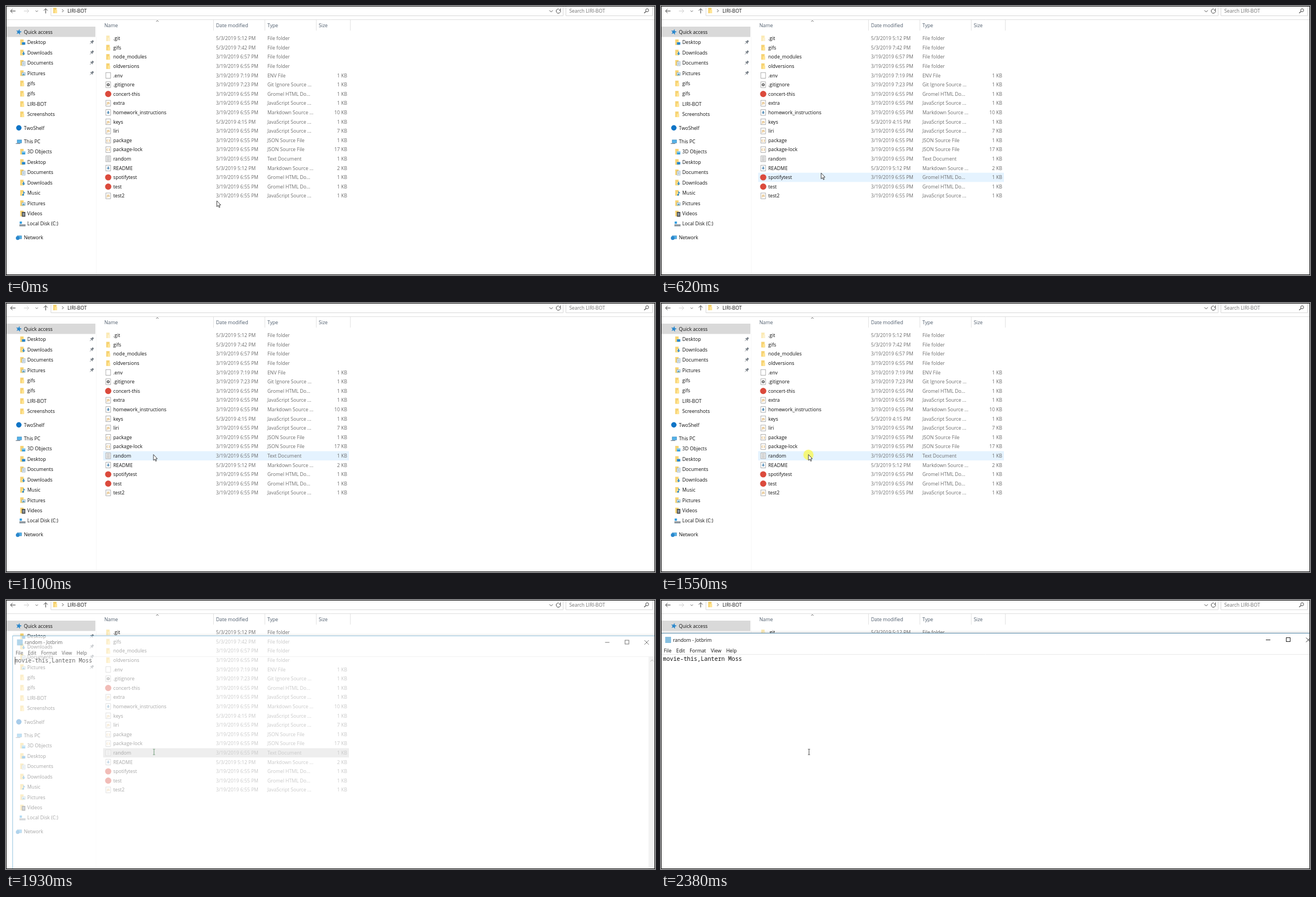
These frames come from a looping animation (1162 by 482 pixels, 2.7 s). An HTML page with a canvas:

```html
<!DOCTYPE html>
<html lang="en">
<head>
<meta charset="utf-8">
<title>File window</title>
<style>
html, body { margin: 0; width: 100%; height: 100%; overflow: hidden; background: #fff; }
canvas { display: block; width: 1162px; height: 482px; }
</style>
</head>
<body>
<canvas id="stage" width="1162" height="482"></canvas>
<script>
const W = 1162, H = 482, LOOP = 2700, OPEN = 1930;
const g = document.getElementById('stage').getContext('2d');
const SANS = '8.7px "Open Sans", "Noto Sans", sans-serif';
const MONO = '500 10.25px "Noto Sans Mono", monospace';
const ROW_TOP = 58, ROW_H = 16.6, SIDE_H = 18.45;
const DARK = '#4a4a4a', GRAY = '#6d6d6d', BLUE = '#2a87cc';

const types = {
  hidden: 'File folder', folder: 'File folder', page: 'ENV File', gear: 'Git Ignore Source ...',
  browser: 'Gromel HTML Do...', js: 'JavaScript Source ...', md: 'Markdown Source ...',
  json: 'JSON Source File', text: 'Text Document'
};
// name, kind, size in KB, date if it is not the usual one
const files = `.git,hidden,,5/3/2019 5:12 PM
gifs,folder,,5/3/2019 7:42 PM
node_modules,folder,,3/19/2019 6:57 PM
oldversions,folder
.env,page,1,3/19/2019 7:19 PM
.gitignore,gear,1,3/19/2019 7:23 PM
concert-this,browser,1
extra,js,1
homework_instructions,md,10
keys,js,1,5/3/2019 4:15 PM
liri,js,7
package,json,1
package-lock,json,17
random,text,1
README,md,2,5/3/2019 5:12 PM
spotifytest,browser,1
test,browser,1
test2,js,1`.split('\n').map(s => s.split(','));

// label=icon, one group per line
const groups = `Quick access=star,Desktop=desk,Downloads=down,Documents=docs,Pictures=pics,gifs=folder,gifs=folder,LIRI-BOT=folder,Screenshots=folder
TwoShelf=cloud
This PC=pc,3D Objects=cube,Desktop=desk,Documents=docs,Downloads=down,Music=music,Pictures=pics,Videos=video,Local Disk (C:)=disk
Network=net`.split('\n').map(s => s.split(',').map(item => item.split('=')));

function rect(x, y, w, h, color) {
  g.fillStyle = color;
  g.fillRect(x, y, w, h);
}
function trace(points) {
  g.beginPath();
  for (let i = 0; i < points.length; i += 2) g.lineTo(points[i], points[i + 1]);
}
function line(color, width, ...points) {
  g.strokeStyle = color;
  g.lineWidth = width;
  trace(points);
  g.stroke();
}
function poly(color, ...points) {
  g.fillStyle = color;
  trace(points);
  g.fill();
}
function disc(x, y, r, color) {
  g.fillStyle = color;
  g.beginPath();
  g.arc(x, y, r, 0, 7);
  g.fill();
}
function arc(x, y, r, from, to) {
  g.strokeStyle = DARK;
  g.lineWidth = 1;
  g.beginPath();
  g.arc(x, y, r, from, to);
  g.stroke();
}
function text(s, x, y, color = '#111', font = SANS, align = 'left') {
  g.font = font;
  g.textAlign = align;
  g.fillStyle = color;
  g.fillText(s, x, y + 3.2);
}
function moved(x, y, paint, turn = 0) {
  g.save();
  g.translate(x, y);
  g.rotate(turn);
  paint();
  g.restore();
}
// an open arrowhead pointing right, turned as needed
function chevron(x, y, turn, size = 2.5, color = DARK) {
  moved(x, y, () => line(color, 1, -size / 2, -size, size / 2, 0, -size / 2, size), turn);
}

// icons are drawn around 0,0
function folder(back = '#f6d271', front = '#ffe391') {
  rect(-3.5, -5, 6, 10, back);
  rect(-1, -1, 4.5, 6, front);
}
function page() {
  rect(-4.5, -5.5, 9, 11, '#8d8d8d');
  rect(-3.8, -4.8, 7.6, 9.6, '#fff');
}
function down(size, color) {
  rect(-size / 3, -size, size / 1.5, size, color);
  poly(color, -size, 0, size, 0, 0, size);
}
function lines(n, half, color) {
  for (let i = 0; i < n; i++) {
    const y = (i - (n - 1) / 2) * 1.7;
    line(color, .7, -half, y, half, y);
  }
}
function framed(w, h, edge, inside) {
  rect(-w / 2, -h / 2, w, h, edge);
  rect(-w / 2 + .7, -h / 2 + .7, w - 1.4, h - 1.4, inside);
}
// a folder with a small sign in its lower right corner
const badge = sign => () => { folder(); moved(2.5, 1.5, sign); };
const label = s => () => {
  page();
  text(s, 0, -1, '#d59b3c', 'bold 5.5px "Open Sans", sans-serif', 'center');
};
const icons = {
  folder: () => folder(),
  hidden: () => folder('#fbeab5', '#fdf1cd'),
  page,
  gear() { page(); disc(0, 0, 2.6, '#555'); disc(0, 0, 1, '#fff'); },
  browser: () => disc(0, 0, 5.6, '#db4a3c'),
  js: label('JS'),
  json: label('{ }'),
  md() { page(); down(2.7, '#3f7fae'); },
  text() { page(); lines(5, 2.8, '#9a9a9a'); },
  star() {
    const p = [];
    for (let i = 0; i < 10; i++) {
      const r = i % 2 ? 2.3 : 5.4, a = i * Math.PI / 5 - 1.35;
      p.push(r * Math.cos(a), r * Math.sin(a));
    }
    poly(BLUE, ...p);
  },
  desk: badge(() => rect(-3, -1.5, 6, 4.5, BLUE)),
  down: badge(() => down(3, BLUE)),
  docs: badge(() => { framed(6, 8, '#7d9ab0', '#fff'); lines(3, 1.6, '#5d92bb'); }),
  pics: badge(() => { framed(6.5, 5.5, '#8aa7b8', '#d5ecf8'); poly('#4d94b8', -2.5, 2, 0, -1, 2.5, 2); }),
  music: badge(() => { line(BLUE, 1.2, 0, 2, 0, -3.5, 2.5, -1); disc(-1, 2, 1.6, BLUE); }),
  video: badge(() => { framed(6, 8.5, '#333', '#555'); rect(-1.6, -2.5, 3.2, 5, '#8a9aa8'); }),
  cube: badge(() => { rect(-3, -2, 6, 5.5, '#3ba0dc'); rect(-3, -2, 6, 2, '#9bd5f3'); }),
  cloud: () => disc(0, 0, 4.8, '#0f74c6'),
  pc() { moved(1, 0, () => framed(8.5, 6, '#2f7fb8', '#55b4ea')); rect(-5.5, 3.3, 8, 1.2, '#6d7f8d'); },
  disk() { rect(-5, 1, 11, 3.6, '#8e979e'); rect(-4.5, -4, 4, 4, '#2c9be0'); },
  net() { moved(1, 0, () => framed(8.5, 6, '#2f7fb8', '#55b4ea')); disc(-2, 1.4, 3.4, BLUE); }
};

function toolbar() {
  const arrow = (x, y, turn, color, size) => moved(x, y, () => {
    line(color, 1.1, -size, 0, size, 0);
    chevron(size - 1.8, 0, 0, 3.6, color);
  }, turn);
  arrow(12.5, 9, Math.PI, DARK, 4.5);
  arrow(36.5, 9, 0, '#cfcfcf', 4.5);
  arrow(71, 9, -Math.PI / 2, DARK, 4.3);
  chevron(55, 9.2, Math.PI / 2, 2.2, GRAY);

  const box = (x, right) => line('#d9d9d9', 1, x, 1, x, 17.5, right, 17.5, right, 1);
  box(80.5, 997.5);
  box(1002.5, 1157.5);
  moved(88, 8, icons.folder);
  chevron(101.7, 8.5, 0);
  text('LIRI-BOT', 110, 8.7);
  chevron(976, 9.2, Math.PI / 2, 3);
  arc(989, 9.2, 3.9, -.5, 4.9);
  line(DARK, 1, 992.7, 4.5, 992.7, 7.3, 990, 7.3);
  text('Search LIRI-BOT', 1008.5, 9, '#707070');
  arc(1148, 7.6, 2.7, 0, 7);
  line(DARK, 1.3, 1146, 9.6, 1142.7, 12.8);
  line('#dedede', 1, 1, 24.5, W, 24.5);
}

function pin() {
  rect(-1.7, -4, 3.4, 4, '#7a828a');
  rect(-2.9, -.3, 5.8, 1.2, '#7a828a');
  line('#7a828a', .9, 0, .5, 0, 4.5);
}

function sidebar() {
  rect(1, 37, 159, 18.5, '#d9d9d9');
  line('#f7f7f7', 1, 161.5, 37, 161.5, H);
  let y = 46.5;
  groups.forEach((items, k) => {
    items.forEach(([name, icon], i) => {
      moved(i ? 29 : 23, y, icons[icon]);
      text(name, i ? 38 : 32, y);
      if (!k && i > 0 && i < 5) moved(153.5, y, pin, Math.PI / 4);
      y += SIDE_H;
    });
    y += 5.8;
  });
}

function list(t, pointer) {
  const cols = [176, 376, 468, 560];
  chevron(271, 27, -Math.PI / 2, 2.2, GRAY);
  ['Name', 'Date modified', 'Type', 'Size'].forEach((s, i) => {
    text(s, cols[i], 35, '#4f5d6d');
    const edge = (cols[i + 1] || 621) - 4.5;
    line('#e3e3e3', 1, edge, 25, edge, 44);
  });

  const hover = Math.round((pointer.y - ROW_TOP) / ROW_H);
  const fill = t >= OPEN ? '#d3d3d3' : t >= 1630 ? '#cce8ff' : '#e5f3ff';
  files.forEach(([name, kind, size, date = '3/19/2019 6:55 PM'], i) => {
    const y = ROW_TOP + i * ROW_H;
    if (i === hover) rect(174, y - ROW_H / 2, 440, ROW_H, fill);
    moved(183, y, icons[kind]);
    text(name, 192, y);
    text(date, cols[1], y, GRAY);
    text(types[kind], cols[2], y, GRAY);
    if (size) text(size + ' KB', 611, y, GRAY, SANS, 'right');
  });
}

// how much of the opening is still to come, a quarter left after each step
function openingLeft(t) {
  const step = Math.floor((t - OPEN) / 80);
  return step < 3 ? .25 ** step : 0;
}

function editor(t) {
  const left = openingLeft(t), scale = 1 - .021 * left;
  const cx = 588, cy = 285, top = 59.5;
  g.save();
  g.globalAlpha = 1 - .37 * left;
  g.translate(cx, cy);
  g.scale(scale, scale);
  g.translate(-cx, -cy);
  for (let i = 1; i < 6; i++) rect(0, top - i, 1176, i, 'rgba(0,0,0,.02)');
  rect(0, top, 1176, 452, '#fff');
  g.strokeStyle = left ? '#4f9fcb' : '#5b8fae';
  g.lineWidth = 1;
  g.strokeRect(-.5, top, 1177, 452);
  rect(7.5, 66, 10.5, 11, '#86bfe0');
  text('random - Jotbrim', 21.5, 71.5);
  let x = 5;
  for (const s of ['File', 'Edit', 'Format', 'View', 'Help']) {
    text(s, x, 90.5);
    x += g.measureText(s).width + 8.6;
  }
  line('#e9e9e9', 1, 0, 97.5, 1176, 97.5);
  rect(1162.5, 98, 13, 413, '#ececec');
  chevron(1169, 105, -Math.PI / 2, 3, '#888');
  line('#222', 1, 1083, 71.5, 1091, 71.5);
  g.strokeRect(1119.5, 67.5, 7, 7);
  line('#222', 1, 1155, 67.5, 1163, 75.5);
  line('#222', 1, 1163, 67.5, 1155, 75.5);
  text('movie-this,Lantern Moss', 3.5, 105.3, '#111', MONO);
  if (t < 2380) line('#000', 1, 4, 98, 4, 112);
  g.restore();
}

// share of a move done at t, in seven even steps
function progress(t, from, to) {
  const step = Math.floor((t - from) / ((to - from) / 6) + 1.001);
  return Math.min(Math.max(step / 7, 0), 1);
}
// sets off slowly, rests, then slows down into the chosen row
function pointerAt(t) {
  const go = progress(t, 80, 540), rest = 1 - progress(t, 620, 1100);
  return {
    x: 377.5 - 74.5 * go ** 2 - 39 * (1 - rest ** 3.5) * (go === 1),
    y: 349 - 38 * go ** 1.3 - 39.5 * (1 - rest ** 2.3) * (go === 1)
  };
}

function arrowPointer({ x, y }) {
  const shape = [0, 0, 0, 10.5, 2.4, 8.4, 4, 12, 5.6, 11.3, 4, 7.8, 7, 7.6, 0, 0];
  moved(x, y, () => {
    poly('#fff', ...shape);
    line('#222', .85, ...shape);
  });
}
function textPointer(color) {
  line(color, 1, 265, 267.5, 265, 277);
  for (const y of [267.3, 277.2]) line(color, .8, 263, y, 267, y);
}

function draw(t) {
  rect(0, 0, W, H, '#fff');
  const pointer = pointerAt(t);
  toolbar();
  sidebar();
  list(t, pointer);
  if (t >= OPEN) {
    editor(t);
    textPointer(openingLeft(t) ? '#6f9a76' : '#444');
  } else {
    const sinceClick = t - 1550;
    if (sinceClick >= 0 && sinceClick < 240 && sinceClick % 160 < 80) {
      disc(264, 272, 9.2, 'rgba(250,248,70,.72)');
    }
    arrowPointer(pointer);
  }
  g.strokeStyle = '#111';
  g.lineWidth = 1;
  g.strokeRect(.5, .5, W - 1, H - 1);
}

const start = performance.now();
function tick() {
  draw((performance.now() - start) % LOOP);
  requestAnimationFrame(tick);
}
tick();
</script>
</body>
</html>
```
